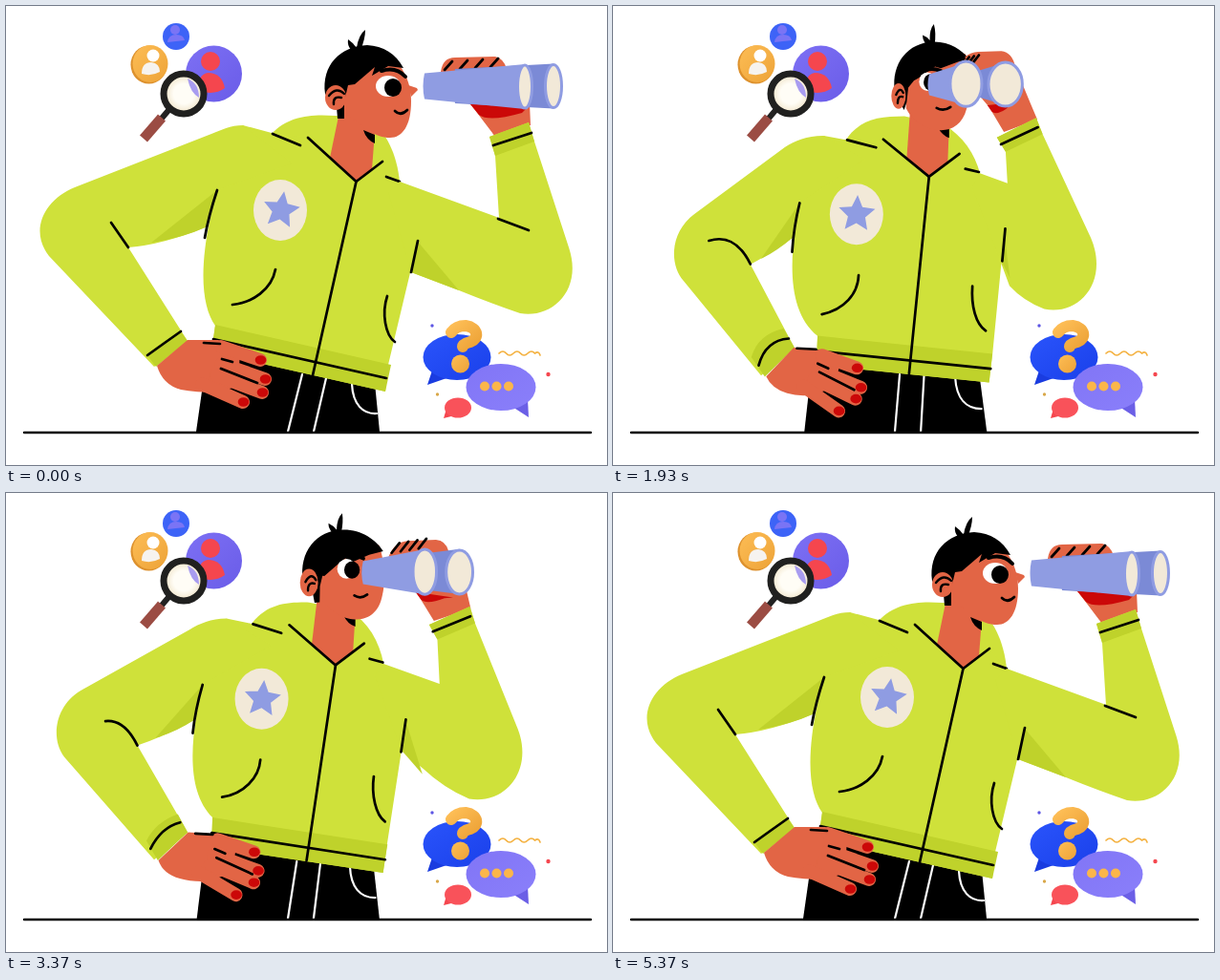
Recreate the animation shown at these times as an HTML page. Size 629 by 481 pixels, loop 5410 ms.

```html
<!DOCTYPE html>
<html lang="en">
<head>
<meta charset="utf-8">
<title>Looking through binoculars</title>
<style>
  html, body { margin: 0; width: 100%; height: 100%; overflow: hidden; background: #fff; }
  svg { display: block; width: 100vw; height: 100vh; }
  path { stroke-linecap: round; stroke-linejoin: round; }
</style>
</head>
<body>
<svg viewBox="0 0 629 481">
  <defs>
    <linearGradient id="violet" x1="0" y1="0" x2="1" y2="1">
      <stop offset="0" stop-color="#7d70f4"/><stop offset="1" stop-color="#6a5ce8"/>
    </linearGradient>
    <linearGradient id="lilac" x1="0" y1="0" x2="1" y2="1">
      <stop offset="0" stop-color="#8175f6"/><stop offset="1" stop-color="#8a7ffa"/>
    </linearGradient>
    <linearGradient id="blue" x1="0" y1="0" x2="1" y2="1">
      <stop offset="0" stop-color="#2a54fb"/><stop offset="1" stop-color="#1a40ea"/>
    </linearGradient>
    <linearGradient id="gold" x1="0" y1="0" x2="1" y2="1">
      <stop offset="0" stop-color="#fdbd55"/><stop offset="1" stop-color="#eda338"/>
    </linearGradient>
    <radialGradient id="glass">
      <stop offset=".5" stop-color="#fffdf6"/><stop offset="1" stop-color="#f0e3c6"/>
    </radialGradient>
  </defs>

  <g id="people">
    <circle cx="178" cy="32" r="14" fill="#3d63f7"/>
    <circle cx="177" cy="25" r="5" fill="#7a74f5"/>
    <path d="M169 38Q170 30 178 30Q186 30 187 36Z" fill="#7a74f5"/>
    <ellipse cx="149.500" cy="61.500" rx="19" ry="20" fill="#dd912d"/>
    <ellipse cx="151" cy="60.500" rx="18.500" ry="19.500" fill="url(#gold)"/>
    <circle cx="154" cy="52" r="6.500" fill="#fff"/>
    <path d="M142 71Q142 59 152 59Q161 60 161 69Q152 74 142 71Z" fill="#f6f3ef"/>
    <circle cx="217.500" cy="71" r="29.500" fill="url(#violet)"/>
    <circle cx="214" cy="58" r="10" fill="#f5464e"/>
    <path d="M203 89Q200 72 211 70Q226 70 229 86Q218 94 203 89Z" fill="#f5464e"/>
    <path d="M172 107L161 120" stroke="#222" stroke-width="6"/>
    <path d="M163 117L144 139" stroke="#9b4c43" stroke-width="10.500" style="stroke-linecap:butt"/>
    <circle cx="186" cy="92" r="21" fill="url(#glass)" stroke="#20201f" stroke-width="7"/>
    <path d="M190 76Q202 81 202 96Q193 91 190 76Z" fill="#a89cf0"/>
  </g>

  <g id="chat">
    <path d="M446 382L441 397L464 389Z" fill="#1a3ce0"/>
    <ellipse cx="472" cy="368" rx="35.500" ry="24" fill="url(#blue)"/>
    <path d="M530 420L547 431L546 412Z" fill="#6b5fe6"/>
    <ellipse cx="518" cy="399.500" rx="36.500" ry="24.500" fill="url(#lilac)"/>
    <path d="M466 342Q471 335 481 335C495 337 495 349 486 352Q478 354 478 357" fill="none" stroke="url(#gold)" stroke-width="12"/>
    <circle cx="475.500" cy="375" r="9.500" fill="url(#gold)"/>
    <g fill="#fbb64a">
      <circle cx="501" cy="398.500" r="5"/><circle cx="513.500" cy="398.500" r="5"/><circle cx="526" cy="398.500" r="5"/>
    </g>
    <path d="M516 364q4-4 7.500 0t7.500 0t7.500 0t7.500 0t7.500 0q4-3 5.500 2" fill="none" stroke="#f4b242" stroke-width="1.700"/>
    <path d="M461 422L458 432L470 429Z" fill="#f5464e"/>
    <ellipse cx="473" cy="421" rx="14" ry="10.500" fill="#f9525a"/>
    <circle cx="446" cy="335" r="1.700" fill="#5d55e4"/>
    <circle cx="567.500" cy="386" r="2.200" fill="#f5464e"/>
    <circle cx="451.500" cy="407" r="1.700" fill="#d9a84a"/>
  </g>

  <g id="figure"></g>
  <path d="M19 447H612" stroke="#000" stroke-width="2.400"/>
</svg>

<script>
const LOOP = 5410, SWING = LOOP / 4, DELAY = 15, MID = 0.6;
const INK = '#000', SKIN = '#e26545', LIME = '#cfe13a', SHADE = '#bfd22b';
const BLUE = '#8f9ce2', CREAM = '#f2e9d8', RED = '#cb0808';
const NUM = /-?\d+(\.\d+)?/g;
const figure = document.getElementById('figure');
const parts = [];

// A part is one path in three poses: side, turning, front.
function part(attrs, poses, fade) {
  const el = document.createElementNS('http://www.w3.org/2000/svg', 'path');
  for (const key in attrs) el.setAttribute(key, attrs[key]);
  figure.append(el);
  const nums = poses.map(d => d.match(NUM).map(Number));
  parts.push({ el, nums, shape: poses[0].split(/-?\d+(?:\.\d+)?/), fade });
}
const fill = (color, ...poses) => part({ fill: color }, poses);
const line = (color, width, poses, fade) =>
  part({ fill: 'none', stroke: color, 'stroke-width': width }, poses, fade);
const ink = (...poses) => line(INK, 2.7, poses);

const ovalPath = (x, y, rx, ry) =>
  `M${x - rx} ${y}a${rx} ${ry} 0 1 0 ${2 * rx} 0a${rx} ${ry} 0 1 0 ${-2 * rx} 0`;
const oval = (color, ...poses) => fill(color, ...poses.map(p => ovalPath(...p)));

function starPath(x, y, turn) {
  const pts = Array.from({ length: 10 }, (_, i) => {
    const a = (i * 36 - 90 + turn) * Math.PI / 180, r = i % 2 ? 9.5 : 20;
    return (x + r * Math.cos(a)).toFixed(2) + ' ' + (y + r * Math.sin(a)).toFixed(2);
  });
  return 'M' + pts.join('L') + 'Z';
}

// Trousers
fill(INK, 'M212 355L199 446L391 446L385 385Z', 'M210 360L200 446L391 446L383 380Z', 'M209 365L201 446L392 446L381 375Z');
line('#fff', 2.2, ['M310 386L295 446', 'M302 386L295 446', 'M295.5 386L295 446']);
line('#fff', 2.2, ['M335 390L322 446', 'M327 388L322 446', 'M322.5 387L322.5 446']);
line('#fff', 2.2, ['M362 396C363 418 374 428 388 427', 'M359 390C360 412 370 423 386 423', 'M356 388C358 408 368 420 385 420']);

// Hood and neck
fill(LIME,
  'M278 134C295 115 320 113 345 115L380 118C398 132 409 155 412 184L366 184Z',
  'M250 138C266 117 285 115 310 115L352 124C372 136 384 155 389 177L337 180Z',
  'M231 145C243 122 265 117 297 117L335 125C355 138 367 155 373 171L317 178Z');
fill(SKIN,
  'M350 106L339 159L366.5 184L383 171L386 132Z',
  'M318 104L313 159L337 180L356 165L358 125Z',
  'M297 104L295 162L317 178L338 163L338 120Z');
fill(INK,
  'M374 130L386 135L386 144Q377 140 374 130Z',
  'M346 128L358 128L358 139Q350 136 346 128Z',
  'M328 127L338 124L338 137Q332 134 328 127Z');

// Head
fill(SKIN,
  'M352 60L412 62C420 74 424 85 424 100C424 125 415 138 402 138C386 138 377 128 354 112Z',
  'M316 60L379 52C386 75 384 100 381 108C377 125 365 132 352 131C335 131 322 118 316 108Z',
  'M286 54L342 46C347 70 347 95 344 105C340 122 330 129 318 129C300 129 288 115 285 105Z');
fill(SKIN, 'M421 83L430 86L431 88L424 95Z', 'M380 80L383 83L383 85L380 90Z', 'M340 80L342 83L342 85L340 90Z');
fill(INK,
  'M334 92C330 62 350 42 378 41C395 42 408 50 416 65L400 63L383 73L386 64L365 82L358 83L354 100L354 118L347 118L346 106Z',
  'M302 90C298 62 315 38 344 38C362 38 376 48 383 58L370 62L350 70L345 66L325 82L322 83L318 92L317 108L313 112L311 105Z',
  'M279 84C276 58 294 38 319 37C330 38 338 42 344 47L338 47L328 50L321 55L312 54L300 62L288 66L284 80L285 100L284 108L282 104Z');
fill(INK,
  'M361 46Q357 41 358 35Q364 39 367 44Q369 30 376 25Q376 35 371 46Z',
  'M335 42Q330 37 330 31Q335 33 338 37Q338 25 343 20Q345 29 343 41Z',
  'M315 41Q311 37 311 30Q315 31 317 34Q316 23 320 17Q324 27 322 40Z');
oval(SKIN, [345, 96, 11, 13], [307, 94, 8.5, 14], [281, 96, 5, 11]);
line(INK, 2.4, ['M338 94Q346 84 354 92', 'M304 93Q309 83 313 91', 'M279 93Q281 87 283 91']);
line(INK, 2.4, ['M343 103Q342 94 351 96', 'M306 102Q306 93 312 95', 'M280 101Q280 95 283 96']);
oval('#fff', [400, 84, 13, 11], [341, 79, 9, 10], [303, 81, 8, 9]);
oval(INK, [405, 85.5, 9, 9.5], [346, 80, 8, 9], [304, 81, 8, 9]);
line(INK, 4, ['M393 68Q408 63 418 74', 'M334 70Q344 62 357 68', 'M295 70Q305 66 312 70']);
ink('M407 110Q413 116 420 109', 'M350 107Q357 111 364 106', 'M315 107Q323 112 331 106');

// Raised hand
fill(SKIN,
  'M455 69Q457 54 470 54L512 53Q521 55 524 66L548 102L549 125L512 137L487 104Z',
  'M378 68Q384 50 400 49L426 48Q437 49 440 62L457 102L463 120L426 133L410 106Z',
  'M320 60Q326 46 340 46L362 46Q375 49 378 70L392 102L402 117L374 130L358 106Z');
fill(RED,
  'M486 103L547 105L540 112Q505 122 495 114Z',
  'M408 104L440 106L432 109Q418 116 413 111Z',
  'M357 104L371 85L370 104Q367 112 361 110Z');
fill(RED, 'M480 80L486 80L484 84Z', 'M400 72L406 72L404 76Z', 'M312 55L327 54L322 60Z');
[0, 1, 2, 3].forEach(i => {
  const a = 459 + i * 16, b = 381 + i * 7, y = 67 - i, z = 62 - i * 1.3;
  ink(`M${a} ${y}L${a + 8} ${y - 9}`, `M${b} ${z}L${b + 7} ${z - 9}`, `M${318 + i} 62L${319 + i} 61`);
});

// Binoculars: eyepiece to lens, far barrel first
const barrel = (color, ...poses) => fill(color, ...poses.map(([ex, ey, er, x, y, r]) =>
  `M${ex} ${ey - er}L${x} ${y - r}L${x} ${y + r}L${ex} ${ey + er}Q${ex - 3} ${ey} ${ex} ${ey - er}Z`));
const lens = (...poses) => part({ fill: CREAM, stroke: BLUE, 'stroke-width': 3 },
  poses.map(p => ovalPath(...p)));
barrel('#7b8ad6', [470, 84, 18, 573, 84, 23.5], [392, 82, 14, 439, 82, 23], [349, 81, 8, 349, 81, 20]);
lens([573, 84, 8.5, 22.5], [439, 82.5, 16, 23], [349, 81, 21.5, 23]);
barrel(BLUE, [438, 84, 13.5, 543, 84.5, 23.5], [350, 83, 11.5, 400, 82, 23], [289, 81, 10, 303, 81, 20]);
lens([543, 84.5, 7.5, 22.5], [400, 82, 14.5, 23], [302.5, 81, 21.5, 23]);

// Jacket
fill(LIME,
  'M248 125L278 133L316 138L366.5 184L394 163L412 184L431 246L400 376L397 404L215 363L219 335C203 312 201 265 221 193Z',
  'M225 134L251 139L289 139L337 180L368 156L389 177L414 235L398 366L394 396L214 374L215 343C184 315 188 260 200 203Z',
  'M212 140L232 144L269 142L317 178L351 153L373 171L400 235L395 362L393 391L209 380L212 353C174 330 176 265 185 212Z');
fill(SHADE,
  'M219 334L403 376L397 404L215 363Z',
  'M215 343L398 366L394 396L214 374Z',
  'M212 352L395 362L393 391L209 380Z');

// Arm on the hip
fill(LIME,
  'M248 125C235 125 225 130 215 134L72 190C40 203 24 235 45 262L155 378L190 351L128 253Q165 250 211 231L221 193L300 165Z',
  'M225 134C208 134 196 139 185 146L82 213C54 232 54 268 69 284L155 386L190 357L141 268Q165 258 193 240L200 204L270 160Z',
  'M212 140C195 139 180 144 170 152L95 228C68 252 72 280 84 296L155 389L188 358L150 276Q160 267 181 247L185 212L250 165Z');
fill(SHADE,
  'M221 193L152 248Q185 243 211 231Z',
  'M200 204L156 261Q175 254 194 239Z',
  'M185 212L150 275Q164 264 181 246Z');
ink('M110 227Q119 240 128 253', 'M102 243Q126 237 141 268', 'M97 252Q132 240 150 275');
fill(SHADE,
  'M147 365Q164 352 182 340L190 351L157 378Z',
  'M146 366Q154 344 179 337L190 357L159 387Z',
  'M141 374Q147 346 177 342L190 360L158 391Z');
ink('M148 366Q166 353 183 341', 'M152 375Q161 350 183 347', 'M153 380Q156 352 187 352');

// Jacket details
oval(CREAM, [287, 214, 28, 32], [260.5, 217, 28, 32], [242.5, 221.5, 28, 32]);
fill(BLUE, starPath(288, 214, 9), starPath(261, 217, 4), starPath(242, 221, 0));
ink('M221 193Q212 220 208 243', 'M200 204Q193 230 191 255', 'M185 212Q180 238 180 264');
ink('M279 134L308 146', 'M251 139L281 147.5', 'M232 144L263 150.5');
ink('M316 138L366.5 184L394 163', 'M289 139L337 179.5L368 156', 'M269 142L317 178L351 153');
ink('M398 179L412 184', 'M374 172L388 175.5', 'M357 168L372 171');
ink('M366.5 184L321 387', 'M337 180L312 385', 'M317 178L305 386');
ink('M217 349L398 390', 'M214 359L396 382', 'M209 367L393 376');
ink('M282 276C278 297 258 311 237 313', 'M261 281C260 300 245 317 222 321', 'M249 285C248 307 235 321 211 328');
ink('M399 304C393 322 397 345 407 352', 'M380 295C378 315 383 335 393 342', 'M368 291C367 313 372 330 384 337');

// Raised arm
fill(LIME,
  'M400 195L412 184L516 222L512 157L506 137L547 122L553 142L589 253C604 297 572 328 538 322Q506 311 474 298L424 279Z',
  'M380 190L389 177Q410 180 431 192L429 153L420 138L462 118L468 135L516 245C534 290 503 326 466 319Q442 309 424 290L409 268Z'.replace('Q410 180 431 192', 'L431 192'),
  'M365 190L373 171L373 172L371 153L362 137L400 116L409 133L465 238C488 285 455 322 420 313Q405 311 397 306L397 268Z');
fill(SHADE, 'M431 247L474 298L424 279Z', 'M414 240L424 290L410 268Z', 'M399 240L399 270L398 268Z');
line(INK, 2.7, ['M431 246L424 279', 'M414 235L410 269', 'M403 231L402 264'], p => (0.97 - p) * 8);
line(INK, 2.7, ['M515 223L547 235', 'M431 192L445 200', 'M373 172L374 173'], p => 1 - p * 2.5);
fill(SHADE,
  'M506 137L547 122L553 142L512 157Z',
  'M420 138L462 118L468 135L429 153Z',
  'M362 137L400 116L409 133L371 153Z');
ink('M510 146L550 133', 'M424 145L463 128', 'M367 145L405 125');

// Hand on the hip
fill(SKIN,
  'M158 377L190 350L222 350L245 360L243 398L222 405Q198 405 183 402Q164 397 158 377Z',
  'M160 387L190 357L214 359L240 369L234 398L212 407Q195 409 182 405Q165 400 160 387Z',
  'M161 390L186 360L210 361L235 372L228 400L212 408Q196 412 183 408Q168 402 161 390Z');
const fingers = [
  ['M225 357L266 371', 'M220 365L257 378', 'M215 368L251 382'],
  ['M225 375L271 391', 'M215 380L261 398', 'M212 384L255 404'],
  ['M220 387L268 405', 'M212 390L256 410', 'M208 392L249 416'],
  ['M205 396L248 415', 'M200 398L238 423', 'M198 399L232 427']
];
fingers.forEach(poses => line(SKIN, 14, poses));
fingers.forEach(poses => oval(RED, ...poses.map(d => {
  const [, , x, y] = d.match(NUM).map(Number);
  return [x + 0.5, y, 5.8, 4.8];
})));
ink('M207 353L224 354', 'M195 358L214 359', 'M187 360L210 361');
ink('M226 370L237 373', 'M216 374L227 379', 'M211 376L222 381');
ink('M225 380L263 395', 'M218 383L255 401', 'M211 385L246 405');

const STEEP = 3.3;
const ease = u => u < 0.5 ? (2 * u) ** STEEP / 2 : 1 - (2 - 2 * u) ** STEEP / 2;

function turnAt(ms) {
  const u = ((ms - DELAY + LOOP) % (2 * SWING)) / SWING;
  return ease(u < 1 ? u : 2 - u);
}

// Each number follows a parabola through its three poses.
function draw(p) {
  const a = (p - MID) * (p - 1) / MID;
  const b = p * (1 - p) / (MID * (1 - MID));
  const c = p * (p - MID) / (1 - MID);
  for (const { el, nums: [s, m, f], shape, fade } of parts) {
    let d = shape[0];
    for (let i = 0; i < s.length; i++) {
      d += +(s[i] * a + m[i] * b + f[i] * c).toFixed(2) + shape[i + 1];
    }
    el.setAttribute('d', d);
    if (fade) el.setAttribute('opacity', Math.max(0, Math.min(1, fade(p))));
  }
}

const start = performance.now();
function tick() {
  draw(turnAt((performance.now() - start) % LOOP));
  requestAnimationFrame(tick);
}
tick();
</script>
</body>
</html>
```
